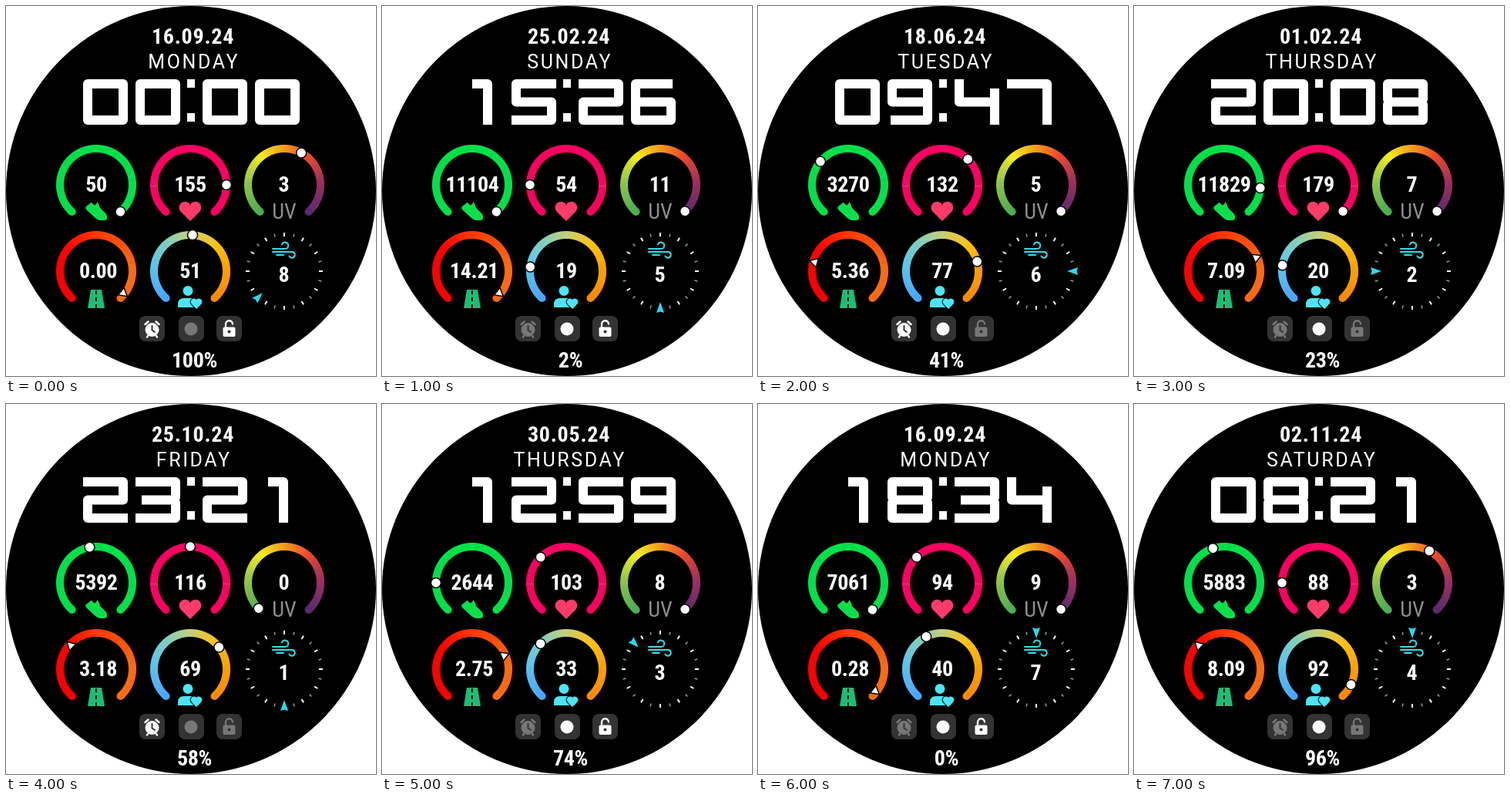
An HTML page that plays this animation: 480 px wide and 480 px high, repeating every 8 s.

```html
<!DOCTYPE html>
<html lang="en">
<head>
<meta charset="utf-8">
<title>Watch face</title>
<style>
html, body { margin: 0; width: 100%; height: 100%; overflow: hidden; background: #fff; }
#face { position: absolute; left: 0; top: 0; width: 480px; height: 480px; border-radius: 50%; background: #000; }
.ring {
  position: absolute; width: 108px; height: 108px;
  -webkit-mask: radial-gradient(#0000 41.5px, #000 42.5px 51.5px, #0000 52.5px);
  mask: radial-gradient(#0000 41.5px, #000 42.5px 51.5px, #0000 52.5px);
}
svg { position: absolute; left: 0; top: 0; }
text { font-family: "Roboto Condensed", Roboto, sans-serif; font-stretch: condensed; font-size: 28px; text-anchor: middle; fill: #fff; }
.num { font-weight: 600; }
#day { font: 400 25px Roboto, sans-serif; letter-spacing: 2.6px; }
#uvLabel { fill: #8e8e8e; font-weight: 400; }
#clock path { fill: none; stroke: #fff; stroke-width: 12; stroke-linejoin: round; }
.dot { fill: #fff; stroke: #000; stroke-width: 1.5; }
.key { fill: #333; }
.off { color: #777; }
.on { color: #fff; }
</style>
</head>
<body>
<div id="face">
<svg width="480" height="480" viewBox="0 0 480 480">
  <g id="caps"></g>
  <path d="M187 233.5h10M281 233.5h10" stroke="#ff3d80" stroke-width="1"/>

  <text id="date" class="num" x="242.5" y="49"></text>
  <text id="day" x="243.7" y="81"></text>
  <g id="clock">
    <path transform="translate(100 95)"/><path transform="translate(168 95)"/>
    <path transform="translate(255 95)"/><path transform="translate(323 95)"/>
    <path d="M240 95v11M240 139v11" style="stroke-width:10"/>
  </g>

  <text id="steps" class="num" x="117" y="241"></text>
  <text id="heart" class="num" x="239" y="241"></text>
  <text id="uv" class="num" x="360.5" y="241"></text>
  <text id="km" class="num" x="119.5" y="353"></text>
  <text id="body" class="num" x="239" y="353"></text>
  <text id="wind" class="num" x="360.5" y="358"></text>
  <text id="battery" class="num" x="244.5" y="469"></text>
  <text id="uvLabel" x="361" y="276">UV</text>

  <!-- shoe, heart, road, person -->
  <path fill="#0be04b" d="M104 260L111 254.500Q113 259 116 258L119 254L122 262L130 270Q133 277 128 278H122Q119 278 116 275L105 265Q102 262 104 260Z"/>
  <path fill="#ff3b69" d="M239 279L227 267C221 260 228 252 234 254Q238 255 239 258Q240 255 244 254C250 252 257 260 251 267Z"/>
  <path fill="#1bbf73" d="M110 368H124L128 392H106Z"/>
  <path stroke="#000" stroke-width="2" stroke-dasharray="5 4" d="M117 369v24"/>
  <g fill="#4be6f5">
    <circle cx="236" cy="369.500" r="6.500"/>
    <path d="M223 391V387Q223 379 231 379H240Q247 379 247 387V391Z"/>
    <path stroke="#000" stroke-width="2" paint-order="stroke" d="M247 393L241 387C237 382 243 377 247 381C251 377 257 382 253 387Z"/>
  </g>

  <g id="ticks"></g>
  <path fill="none" stroke="#35dcea" stroke-width="2" stroke-linecap="round"
    d="M346 315H362a4.200 4.200 0 1 0-4-5.500M346 319H371a3.800 3.800 0 1 1-3.500 5.500M351 323h9"/>

  <g transform="translate(117 232)"><circle id="stepsDot" class="dot" cy="-47" r="6.500"/></g>
  <g transform="translate(239 232)"><circle id="heartDot" class="dot" cy="-47" r="6.500"/></g>
  <g transform="translate(361 232)"><circle id="uvDot" class="dot" cy="-47" r="6.500"/></g>
  <g transform="translate(239 344)"><circle id="bodyDot" class="dot" cy="-47" r="6.500"/></g>
  <g transform="translate(117 344)"><path id="kmDot" class="dot" stroke-linejoin="round" d="M0-52L6-41.500H-6Z"/></g>
  <g transform="translate(361 344)"><path id="windDot" fill="#25dcf0" d="M0-40L5-54L0-52.500L-5-54Z"/></g>

  <rect class="key" x="173" y="402" width="33" height="33" rx="8"/>
  <rect class="key" x="224" y="402" width="33" height="33" rx="8"/>
  <rect class="key" x="273" y="402" width="33" height="33" rx="8"/>
  <g id="alarm" fill="currentColor" stroke="currentColor" stroke-linecap="round">
    <circle cx="189.500" cy="420" r="8.500"/>
    <path stroke-width="2.500" d="M180.500 413l4-3.500M198.500 413l-4-3.500M184 428l-1 1.500M195 428l1 1.500"/>
    <path fill="none" stroke="#333" stroke-width="2" d="M189.500 415v5.500l3.500 2.500"/>
  </g>
  <circle id="link" cx="240" cy="419" r="8.500" fill="currentColor"/>
  <g id="lock">
    <rect x="281.500" y="416.500" width="16" height="12.500" rx="2" fill="currentColor"/>
    <path fill="none" stroke="currentColor" stroke-width="2.300" d="M285 417v-4a4.500 4.500 0 0 1 9-.5v1"/>
    <circle class="key" cx="289.500" cy="422.500" r="2"/>
  </g>
</svg>
</div>
<script>
const $ = id => document.getElementById(id);
const NS = "http://www.w3.org/2000/svg";
const SWEEP = 276, R = 47;

function add(parent, tag, attrs) {
  const el = document.createElementNS(NS, tag);
  for (const k in attrs) el.setAttribute(k, attrs[k]);
  parent.append(el);
}

// Open ring with round ends; colours run clockwise, "colour percent".
function ring(x, y, ...colours) {
  const stops = colours.map(c => {
    const [colour, at] = c.split(" ");
    return at ? `${colour} ${at * SWEEP / 100}deg` : colour;
  });
  const el = document.createElement("div");
  el.className = "ring";
  el.style.left = x - 54 + "px";
  el.style.top = y - 54 + "px";
  el.style.background = `conic-gradient(from ${-SWEEP / 2}deg, ${stops}, #0000 ${SWEEP}deg)`;
  $("face").prepend(el);
  const a = SWEEP / 2 * Math.PI / 180;
  [[-1, colours[0]], [1, colours[colours.length - 1]]].forEach(([side, c]) =>
    add($("caps"), "circle", {
      cx: x + side * R * Math.sin(a), cy: y - R * Math.cos(a), r: 5, fill: c.split(" ")[0]
    }));
}

ring(117, 232, "#00e148 0", "#00e148 100");
ring(239, 232, "#ff0062 0", "#ff0062 100");
ring(361, 232, "#4caf50 0", "#8bc34a 18", "#f2ee1e 36", "#f39a1e 50", "#ee4a2a 64", "#a0305c 80", "#5b2a70 100");
ring(117, 344, "#ff0000 0", "#ff0000 30", "#ff3a00 50", "#ff6a10 80", "#ff6a10 100");
ring(239, 344, "#4aa6ff 0", "#5cc4ee 20", "#7fd0c0 36", "#c4cf78 50", "#ffc20e 66", "#ffa000 82", "#ff8a00 100");

for (let a = 0; a < 360; a += 15) {
  const major = a % 30 === 0;
  add($("ticks"), "path", {
    d: `M361 ${major ? 299 : 298}V294`, stroke: major ? "#fff" : "#999",
    "stroke-width": major ? 2 : 1.5, transform: `rotate(${a} 361 344)`
  });
}

const GLYPHS = [
  "M6 6H52V53H6Z",
  "M17 6H37V59",
  "M0 6H52V29.5H6V53H58",
  "M0 6H52V26L49 29.5L52 33V53H0M8 29.5H49",
  "M6 0V29.5H52M52 12V59",
  "M58 6H6V29.5H52V53H0",
  "M54 6H6V53H52V29.5H6",
  "M0 6H52V59",
  "M6 6H52V26L49 29.5L52 33V53H6V33L9 29.5L6 26ZM9 29.5H49",
  "M4 53H52V6H6V29.5H52"
];

// date, day, time, steps, angle, heart, angle, uv, km, angle, body, wind, angle, switches, battery
const STATES = [
  ["16.09.24", "MONDAY", "0000", 50, 138, 155, 90, 3, "0.00", 129, 51, 8, -135, "101", 100],
  ["25.02.24", "SUNDAY", "1526", 11104, 138, 54, -90, 11, "14.21", 129, 19, 5, 180, "011", 2],
  ["18.06.24", "TUESDAY", "0947", 3270, -50, 132, 45, 5, "5.36", -75, 77, 6, 90, "110", 41],
  ["01.02.24", "THURSDAY", "2008", 11829, 95, 179, 137, 7, "7.09", 67, 20, 2, -90, "010", 23],
  ["25.10.24", "FRIDAY", "2321", 5392, -10.5, 116, 0, 0, "3.18", -47, 69, 1, 180, "100", 58],
  ["30.05.24", "THURSDAY", "1259", 2644, -90, 103, -45, 8, "2.75", 67, 33, 3, -45, "011", 74],
  ["16.09.24", "MONDAY", "1834", 7061, 138, 94, -45, 9, "0.28", 129, 40, 7, 0, "011", 0],
  ["02.11.24", "SATURDAY", "0821", 5883, -18, 88, -90, 3, "8.09", -47, 92, 4, 0, "010", 96]
];

const digits = [...document.querySelectorAll("#clock path")].slice(0, 4);
const turn = (id, a) => $(id).setAttribute("transform", `rotate(${a})`);

function show([date, day, time, steps, stepsA, heart, heartA, uv, km, kmA, body, wind, windA, flags, charge]) {
  const texts = { date, day, steps, heart, uv, km, body, wind, battery: charge + "%" };
  for (const id in texts) $(id).textContent = texts[id];
  digits.forEach((el, i) => el.setAttribute("d", GLYPHS[time[i]]));
  turn("stepsDot", stepsA);
  turn("heartDot", heartA);
  turn("uvDot", Math.min(137, -135 + 54.4 * uv));
  turn("kmDot", kmA);
  turn("bodyDot", -135 + 2.72 * body);
  turn("windDot", windA);
  ["alarm", "link", "lock"].forEach((id, i) => $(id).setAttribute("class", flags[i] === "1" ? "on" : "off"));
}

// Even digit tracking whichever width of the face is installed.
function setTracking() {
  const nums = document.querySelectorAll(".num");
  const probe = $("steps");
  probe.textContent = "0";
  let w = probe.getComputedTextLength();
  if (w > 14.8) {
    nums.forEach(el => el.style.fontSize = "26px");
    w = probe.getComputedTextLength();
  }
  nums.forEach(el => el.style.letterSpacing = (el.id === "date" ? 14.9 : 13.8) - w + "px");
}

let current = -1;
function tick() {
  const i = Math.floor(performance.now() / 1000) % STATES.length;
  if (i !== current) show(STATES[current = i]);
  requestAnimationFrame(tick);
}
setTracking();
tick();
</script>
</body>
</html>
```
